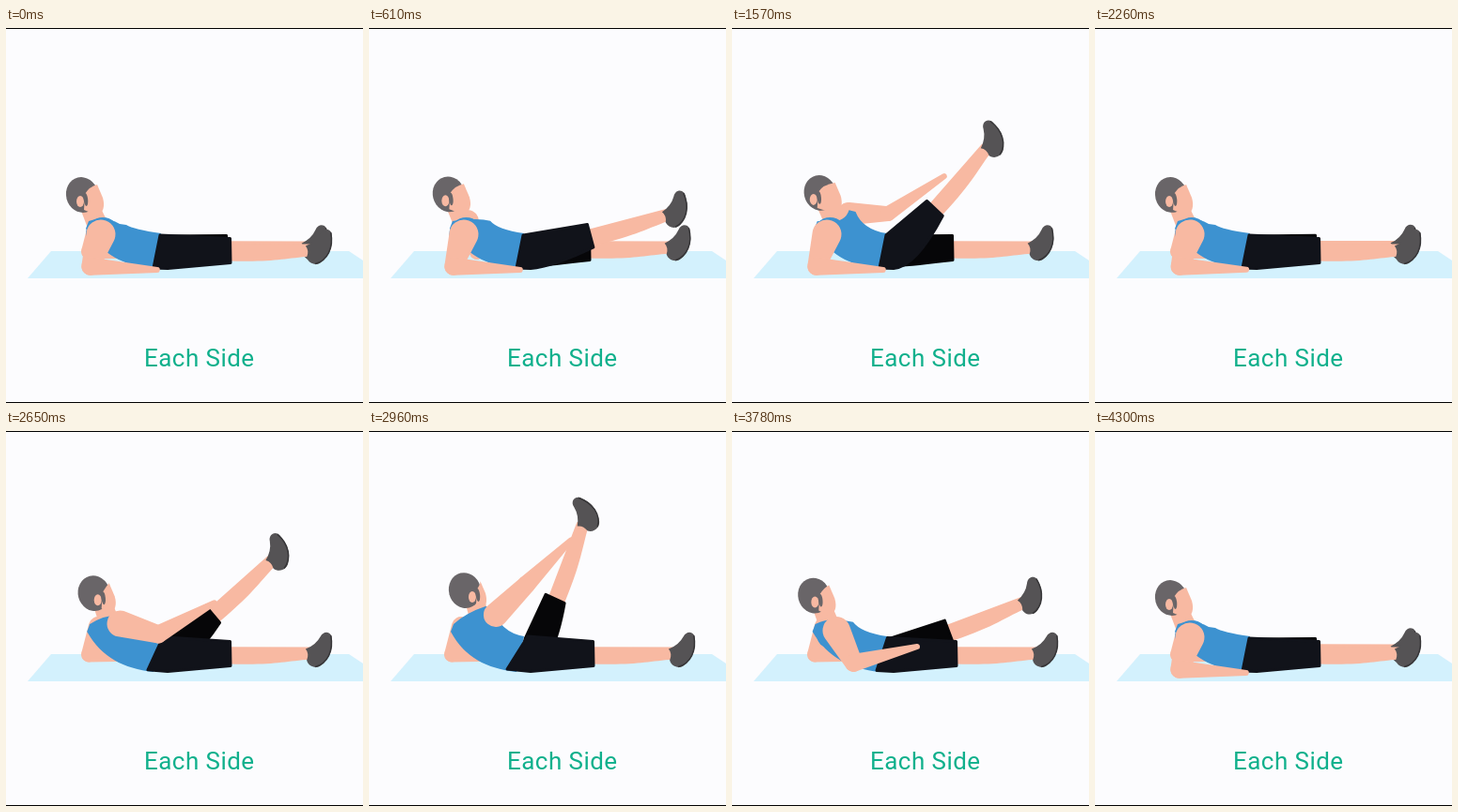
Recreate the animation shown at these times as an HTML page with a canvas. Size 380 px wide and 400 px high, loop 4.34 s.

```html
<!DOCTYPE html>
<html lang="en">
<head>
<meta charset="utf-8">
<title>Leg raise</title>
<style>
  html, body { margin: 0; width: 100%; height: 100%; overflow: hidden; background: #fcfcfe; }
  canvas { display: block; width: 380px; height: 400px; }
</style>
</head>
<body>
<canvas id="stage"></canvas>
<script>
const LOOP = 4340;
const SKIN = '#f8b9a2', SHIRT = '#3d92d0', HAIR = '#696568', SHOE = '#555355', SOLE = '#373638';
const NEAR_SHORTS = '#11131a', FAR_SHORTS = '#060608';

const canvas = document.getElementById('stage');
const ctx = canvas.getContext('2d');
const dpr = window.devicePixelRatio || 1;
canvas.width = 380 * dpr;
canvas.height = 400 * dpr;
ctx.scale(dpr, dpr);

const mix = (a, b, t) => a + (b - a) * t;
const rad = deg => deg * Math.PI / 180;
const polar = ([x, y], len, deg) => [x + len * Math.cos(rad(deg)), y + len * Math.sin(rad(deg))];

function ease(t) {
  t = Math.min(1, Math.max(0, t));
  return t < 0.5 ? 2 * t * t : 1 - 2 * (1 - t) * (1 - t);
}

// Raised amount for a lift starting at `up` and a descent starting at `down`.
const lift = (t, up, down) => ease((t - up) / 750) - ease((t - down) / 785);

// Fills the path that `build` traces, optionally rounding its corners.
function shape(color, build, round = 0) {
  ctx.beginPath();
  build();
  ctx.closePath();
  ctx.fillStyle = ctx.strokeStyle = color;
  ctx.fill();
  if (round) {
    ctx.lineWidth = round;
    ctx.lineJoin = 'round';
    ctx.stroke();
  }
}

const oval = (color, x, y, rx, ry = rx, tilt = 0) =>
  shape(color, () => ctx.ellipse(x, y, rx, ry, tilt, 0, 2 * Math.PI));

// Tapered limb segment between two circles.
function segment([x1, y1], r1, [x2, y2], r2) {
  const dir = Math.atan2(y2 - y1, x2 - x1);
  const open = Math.acos((r1 - r2) / Math.hypot(x2 - x1, y2 - y1));
  shape(SKIN, () => {
    ctx.arc(x1, y1, r1, dir + open, dir - open + 2 * Math.PI);
    ctx.arc(x2, y2, r2, dir - open, dir + open);
  });
}

// Swings from lying along the mat (p = 0) to reaching for the foot (p = 1).
function arm(shoulder, rShoulder, upper, rElbow, fore, p) {
  const elbow = polar(shoulder, upper, 108 - 153 * p);
  const hand = polar(elbow, fore, 3 - 62 * p + 14 * p * p);
  segment(shoulder, rShoulder, elbow, rElbow);
  segment(elbow, rElbow, hand, 3);
}

function shoe() {
  shape(SHOE, () => {
    ctx.moveTo(-1, -4);
    ctx.quadraticCurveTo(10, -8, 15, -17);
    ctx.bezierCurveTo(19, -25, 29, -22, 27, -12);
    ctx.bezierCurveTo(28, 0, 22, 7, 17, 12);
    ctx.bezierCurveTo(12, 18, 2, 16, 0, 8);
    ctx.quadraticCurveTo(3, 1, -1, -4);
  });
  ctx.beginPath();
  ctx.moveTo(26, -18);
  ctx.bezierCurveTo(29, -2, 22, 12, 9, 15);
  ctx.strokeStyle = SOLE;
  ctx.lineWidth = 1.5;
  ctx.stroke();
}

function leg(hip, p, o) {
  const thigh = -64.7 * p;
  const knee = polar(hip, mix(o.thigh, 62, p), thigh);
  const len = 81;

  ctx.save();
  ctx.translate(...knee);
  ctx.rotate(rad(mix(-1, -70.6, p)));
  shape(SKIN, () => {
    ctx.moveTo(-8, -8);
    ctx.lineTo(len + 4, -6);
    ctx.lineTo(len + 4, 7);
    ctx.bezierCurveTo(55, 9, 45, 13, -8, 10);
  });
  ctx.translate(len, 0);
  ctx.rotate(rad(mix(o.foot, 10, p)));
  shoe();
  ctx.restore();

  const half = mix(13.5, 11.5, p);
  shape(o.color, () => {
    ctx.moveTo(...o.top);
    ctx.lineTo(...polar(knee, half, thigh - 92));
    ctx.lineTo(...polar(knee, half - 1, thigh + 90));
    ctx.quadraticCurveTo(196, o.base - 2, 172, o.base);
    ctx.lineTo(...o.bottom);
  }, 3);
}

// `turn` slides the face across the skull: left towards the viewer, right away.
function head(x, y, turn) {
  segment([x + 7 + turn * 0.3, y + 10], 10, [x + 18, y + 36], 11);
  ctx.save();
  ctx.translate(x, y);
  oval(HAIR, 0, 0, 17, 19, -0.25);
  shape(SKIN, () => {
    ctx.moveTo(16, -11);
    ctx.quadraticCurveTo(8 + turn, -9, 3 + turn, -1);
    ctx.lineTo(2 + turn, 16);
    ctx.lineTo(16, 22);
    ctx.quadraticCurveTo(26, 17, 22, 3);
  });
  oval(SKIN, -2 + turn, 7, 4, 6);
  oval(HAIR, 4 + turn, 5, 2.2, 7, -0.1);
  ctx.restore();
}

function shirt(a, b) {
  const left = 88 + 4 * a + 2 * b;
  const right = 121 + 5 * a + 3 * b;
  const collar = 209 - 21 * a - 22 * b;
  if (b < 1) oval(SHIRT, 103 + 2 * a, 220 - 5 * b, 18 * (1 - b));
  shape(SHIRT, () => {
    ctx.moveTo(left, 206);
    ctx.quadraticCurveTo(105 + 21 * a - 2 * b, 200 + 15 * a - 6 * b, right, collar);
    ctx.lineTo(right + 7, collar + 1 + a + b);
    ctx.quadraticCurveTo(136 + 4 * (a + b), 215, 165, 219);
    ctx.lineTo(157, 257);
    ctx.bezierCurveTo(125, 253, 102, 242, left - 3, 214);
  });
}

function scenery() {
  ctx.fillStyle = '#fcfcfe';
  ctx.fillRect(0, 0, 380, 400);
  shape('#d3f1fd', () => {
    ctx.moveTo(48, 238);
    ctx.lineTo(365, 238);
    ctx.lineTo(380, 248);
    ctx.lineTo(380, 267);
    ctx.lineTo(23, 267);
  });
  ctx.fillStyle = '#000';
  ctx.fillRect(0, 0, 380, 1);
  ctx.fillRect(0, 399, 380, 1);
  ctx.fillStyle = '#10b08c';
  ctx.font = '26px Roboto, sans-serif';
  ctx.letterSpacing = '0.45px';
  ctx.textAlign = 'center';
  ctx.fillText('Each Side', 205.8, 361);
}

// a: near leg raised, b: far leg raised.
function figure(a, b) {
  arm([98 + 37 * a, 208 - 14 * a], 10 + 3 * a, 32 + 14 * a, 8, 72, a);
  leg([172, 235], b, {
    thigh: 63, foot: -4, base: 254, color: FAR_SHORTS,
    top: [166, 222], bottom: [160, 253]
  });
  head(81 + 18 * a + 21 * b, 178 - 3 * a - 8 * b, 10 * b - 7 * a);
  shirt(a, b);
  leg([172, 238], a, {
    thigh: 67, foot: 0, base: 256.5, color: NEAR_SHORTS,
    top: [164 + 5 * b, 221 - 2 * b], bottom: [157 - 10 * b, 256 - 2 * b]
  });
  arm([101 + 34 * b, 220 - 24 * b], 15.5 - 2.5 * b, 36 + 10 * b, 9.5, 71 - 4 * b, b);
}

function draw(now) {
  const t = now % LOOP;
  scenery();
  figure(lift(t, 365, 1270), lift(t, 2235, 3300));
}

const start = performance.now();
function tick() {
  draw(performance.now() - start);
  requestAnimationFrame(tick);
}
tick();
</script>
</body>
</html>
```
